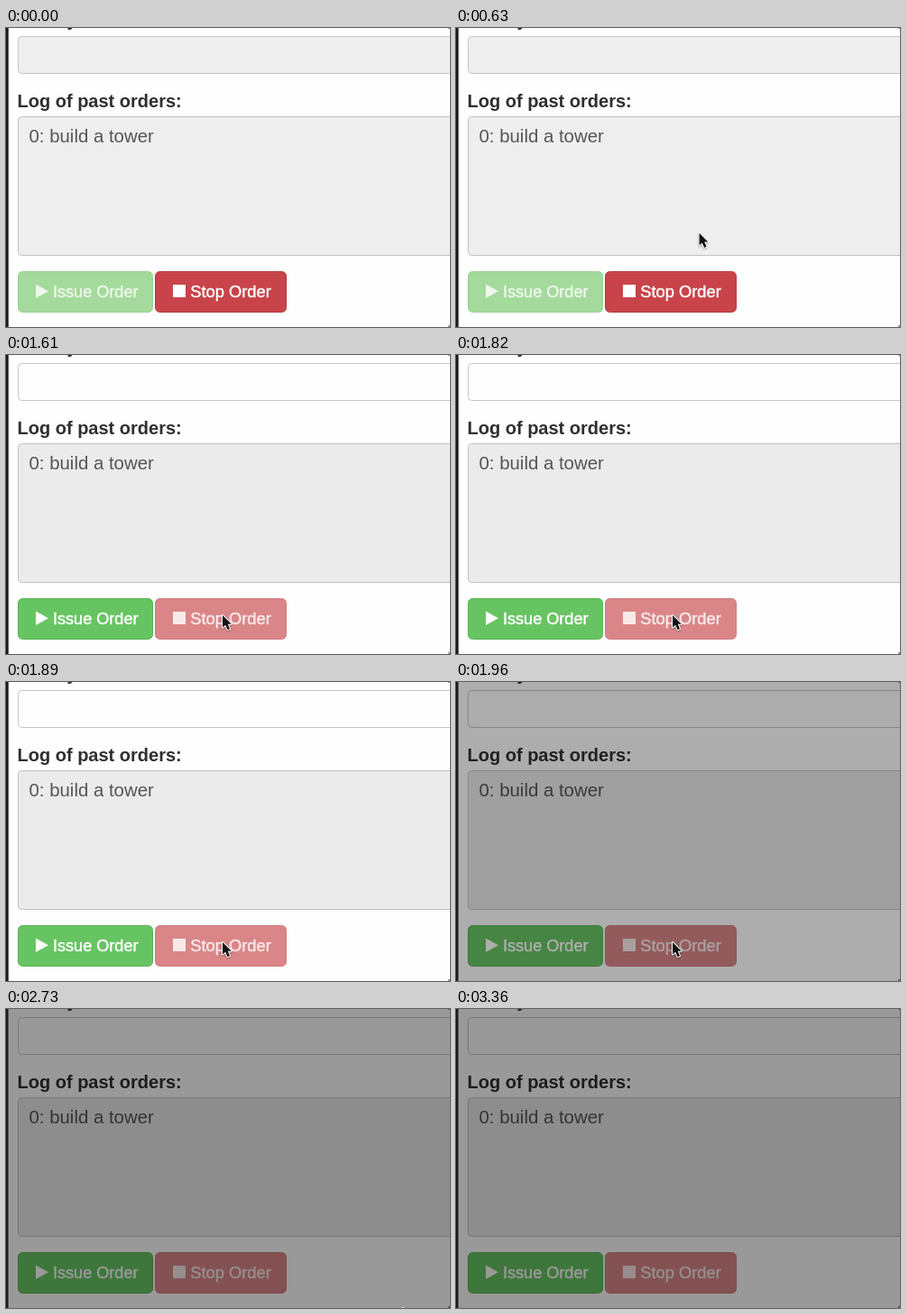
An HTML page with a canvas for the animation above (3.57 s loop, 492x332 px).

```html
<!DOCTYPE html>
<html lang="en">
<head>
<meta charset="utf-8">
<title>Order log</title>
<style>
  html, body { margin: 0; width: 100%; height: 100%; overflow: hidden; background: #fefefe; }
  canvas { display: block; }
</style>
</head>
<body>
<canvas id="stage" width="492" height="332"></canvas>
<script>
const W = 492, H = 332, LOOP = 3570, STEP = 70;
const ctx = document.getElementById('stage').getContext('2d');
const SANS = '"Liberation Sans", Arial, sans-serif';

const CLICK = 1400, DIM_START = 1890, DIM_MAX = 0.4;

const ARROW = new Path2D('M0 0V13.6L3.2 10.7L5.6 16.2L8 15.1L5.7 9.8H9.8Z');
const HAND = new Path2D(
  'M2.4 1.2Q3.7 -.5 5 1.2L7 5.1Q8.4 4.1 9.4 5.3Q10.9 4.6 11.7 6Q13.2 5.6 13.9 7.2' +
  'L15.2 11Q15.6 13 14.4 16L7.6 16.4Q5.8 13.6 2.2 11.7Q.3 10 2.2 9.2L4.7 9.8Z');

const clamp = v => Math.max(0, Math.min(1, v));
const progress = (t, from, to) => clamp((t - from) / (to - from));
const smooth = p => p * p * (3 - 2 * p);
const easeOut = p => 1 - (1 - p) ** 3;
const mix = (a, b, p) => a + (b - a) * p;
const line = (a, b, p) => [mix(a[0], b[0], p), mix(a[1], b[1], p)];
const curve = (a, b, c, p) => line(line(a, b, p), line(b, c, p), p);

function box(x, y, w, h, r, fill, border) {
  ctx.beginPath();
  ctx.roundRect(x + 0.5, y + 0.5, w - 1, h - 1, r);
  ctx.fillStyle = fill;
  ctx.fill();
  ctx.strokeStyle = border;
  ctx.lineWidth = 1;
  ctx.stroke();
}

function label(text, x, y, size, color, weight = 'normal', heft = 0) {
  ctx.font = `${weight} ${size}px ${SANS}`;
  ctx.fillStyle = ctx.strokeStyle = color;
  ctx.fillText(text, x, y);
  if (heft) {
    ctx.lineWidth = heft;
    ctx.strokeText(text, x, y);
  }
}

function page(running, hover) {
  ctx.fillStyle = '#fefefe';
  ctx.fillRect(0, 0, W, H);

  label('y', 67.5, -2.5, 20, '#333', 'bold');
  ctx.fillStyle = '#999';
  ctx.fillRect(490, 0, 2, 1);
  ctx.fillRect(490, 330, 2, 2);

  box(13, 9, 500, 42, 4, running ? '#eee' : '#fefefe', '#c6c6c6');
  label('Log of past orders:', 12.5, 88, 20, '#2f2f31', 'bold');
  box(13, 98, 500, 155, 4, running ? '#eee' : '#ebebec', '#c2c2c2');
  label('0: build a tower', 25.5, 127, 20.4, '#555');

  const go = running ? ['#a4da9c', '#98d192'] : ['#67c462', '#58b354'];
  const stop = !running ? ['#da8688', '#cf7d80']
    : hover ? ['#b6242a', '#9c2026'] : ['#c8444a', '#b43a40'];
  box(13, 270, 150, 46, 5, ...go);
  box(165, 270, 146, 46, 5, ...stop);

  const goText = running ? '#edf8eb' : '#fff';
  const stopText = running ? '#fff' : '#f9eaea';
  ctx.fillStyle = goText;
  ctx.beginPath();
  ctx.moveTo(33, 284.5);
  ctx.lineTo(47, 292.2);
  ctx.lineTo(33, 300);
  ctx.fill();
  label('Issue Order', 52, 299, 18.1, goText, 'normal', 0.45);
  ctx.fillStyle = stopText;
  ctx.fillRect(185, 285, 14, 14);
  label('Stop Order', 204.3, 299, 18.3, stopText, 'normal', 0.45);
}

function dim(t) {
  const p = progress(t, DIM_START, DIM_START + 150);
  ctx.fillStyle = `rgba(0, 0, 0, ${DIM_MAX * (1 - (1 - p) ** 2.6)})`;
  ctx.fillRect(0, 0, W, H);
}

// Left edge of the window, above the dimmed page.
function edge() {
  ctx.fillStyle = '#1d1a1d';
  ctx.fillRect(0, 0, 2, H);
  ctx.fillStyle = '#555256';
  ctx.fillRect(2, 0, 1, H);
}

function pointer(t) {
  if (t < 70) return null;
  if (t < 630) return line([284, 308], [271, 225], easeOut(progress(t, 70, 560)));
  if (t < 1190) return line([271, 225], [238, 289], smooth(progress(t, 560, 1120)));
  if (t < 2030) return [240, 289];
  if (t < 2380) return curve([240, 289], [310, 290], [400, 336], smooth(progress(t, 1960, 2310)));
  if (t < 2730 || t >= 3360) return null;
  if (t < 3290) return curve([440, 332], [365, 212], [267, 318], smooth(progress(t, 2730, 3220)));
  return [266, 323];
}

function cursor(x, y, hand) {
  ctx.save();
  ctx.translate(hand ? x - 5 : x, hand ? y + 1 : y);
  ctx.lineJoin = 'round';
  ctx.shadowColor = 'rgba(0, 0, 0, .35)';
  ctx.shadowBlur = 2;
  ctx.shadowOffsetY = 1;
  const shape = hand ? HAND : ARROW;
  ctx.strokeStyle = hand ? '#222' : '#fff';
  ctx.lineWidth = hand ? 1.6 : 2;
  ctx.stroke(shape);
  ctx.shadowColor = 'transparent';
  ctx.fillStyle = hand ? '#fff' : '#111';
  ctx.fill(shape);
  if (hand) {
    ctx.lineWidth = 0.8;
    ctx.beginPath();
    for (const i of [0, 1, 2]) {
      ctx.moveTo(7 + i * 2.2, 10);
      ctx.lineTo(8 + i * 2.2, 13.5);
    }
    ctx.stroke();
  }
  ctx.restore();
}

function draw(now) {
  const t = Math.floor((now % LOOP) / STEP) * STEP;
  const running = t < CLICK;
  const at = pointer(t);
  const hover = running && t >= 630 && at[1] >= 270;
  page(running, hover);
  if (t > DIM_START) dim(t);
  edge();
  if (at) cursor(at[0], at[1], hover);
}

const start = performance.now();
function frame() {
  draw(performance.now() - start);
  requestAnimationFrame(frame);
}
frame();
</script>
</body>
</html>
```
